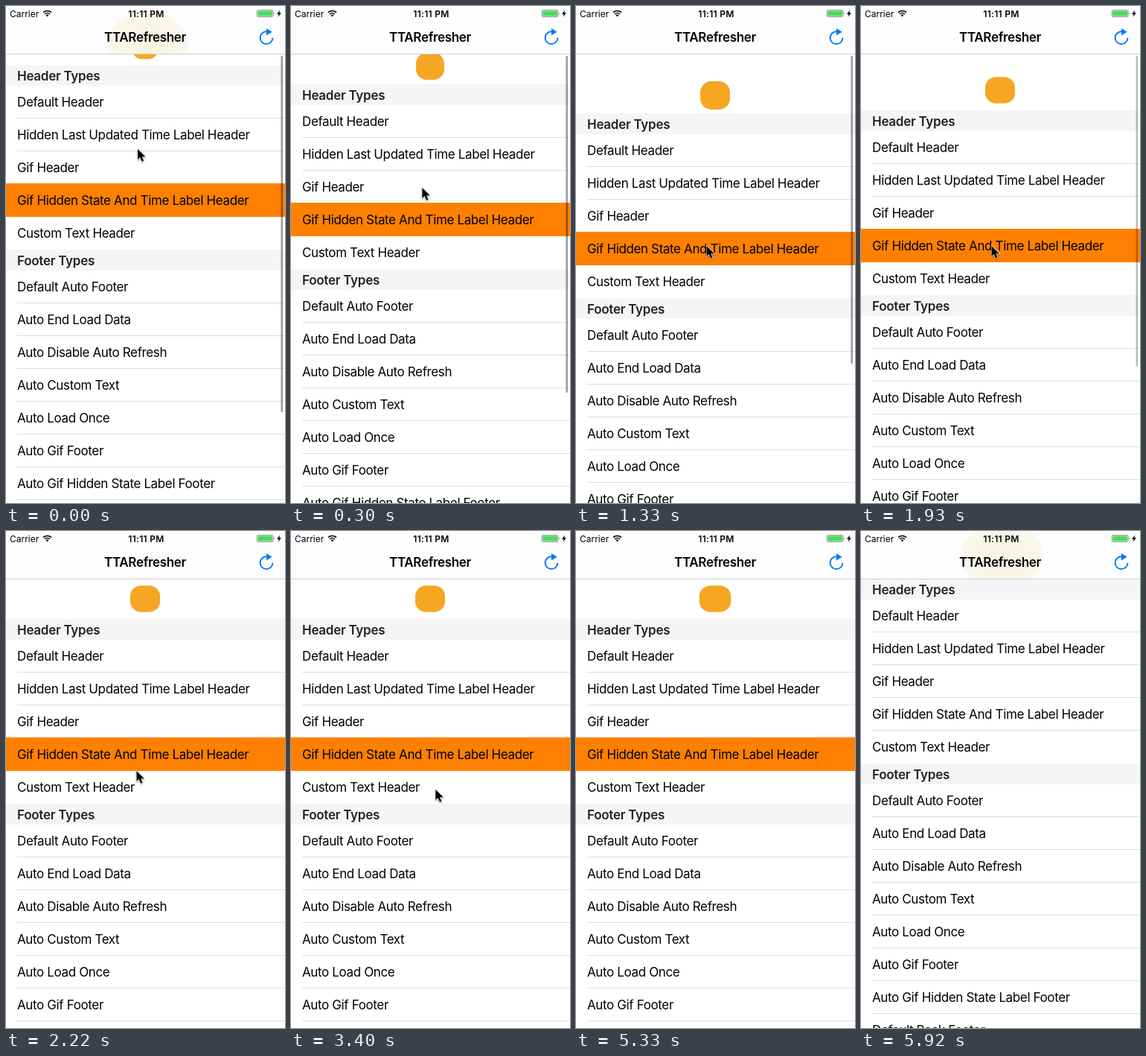
Animation, 375 px wide and 667 px high, one loop 6200 ms. Source, as an HTML page:

```html
<!DOCTYPE html>
<html lang="en">
<head>
<meta charset="utf-8">
<title>TTARefresher</title>
<style>
  html, body { margin: 0; width: 100%; height: 100%; overflow: hidden; background: #fff; }
  svg { display: block; }
  text { font: 17px Inter, Roboto, sans-serif; letter-spacing: -.37px; fill: #000; }
  .section { font-weight: 600; letter-spacing: -.27px; fill: #222; }
  .title { font-weight: 600; letter-spacing: -.32px; text-anchor: middle; }
  .status { font-size: 12px; letter-spacing: 0; }
  .clock { font-weight: 600; text-anchor: middle; letter-spacing: .3px; }
</style>
</head>
<body>
<svg width="375" height="667" viewBox="0 0 375 667">
  <defs>
    <radialGradient id="glow">
      <stop offset="0" stop-color="#f8f3df"/>
      <stop offset="1" stop-color="#faf8ee"/>
    </radialGradient>
  </defs>

  <rect id="mascot" x="-20" y="-19" width="40" height="38" rx="15" fill="#f6a623"/>
  <g id="list"></g>
  <rect id="thumb" x="369.5" y="67" width="2.5" rx="1.25" fill="#000" fill-opacity=".4"/>

  <svg width="375" height="65">
    <rect width="375" height="64" fill="#fdfdfd"/>
    <ellipse id="tint" cx="190" rx="55" ry="45" fill="url(#glow)"/>
    <rect y="64" width="375" height="1" fill="#cfcfcf"/>
  </svg>
  <text class="status" x="5" y="14.5">Carrier</text>
  <g fill="none" stroke="#000" stroke-width="1.5">
    <path d="M50 8.6a8 8 0 0 1 11 0M52 11a5 5 0 0 1 7 0"/>
    <path d="M53.6 12.2a2.8 2.8 0 0 1 3.8 0L55.5 14.4Z" fill="#000" stroke="none"/>
  </g>
  <text class="status clock" x="188.5" y="14.5">11:11 PM</text>
  <rect x="337.3" y="5.5" width="21.7" height="9" rx="1.5" fill="#fff" stroke="#555" stroke-width=".6"/>
  <rect x="338.3" y="6.5" width="19.7" height="7" rx=".5" fill="#4cd964"/>
  <path d="M359.9 8.3q1.6 1.7 0 3.4Z" fill="#555"/>
  <path d="M368.2 5.5L364 10.7H366.6L365.6 14.8L370 9.3H367.3Z"/>
  <text class="title" x="187" y="48">TTARefresher</text>
  <path d="M351 34.3H350A8.4 8.4 0 1 0 358.4 42.7" fill="none" stroke="#007aff" stroke-width="2"/>
  <path d="M350 30V39.4L357.6 34.7Z" fill="#007aff"/>

  <path id="cursor" d="M0 0V14L3.2 11.1L5.7 16.8L8.1 15.8L5.7 10.2H10.3Z"
        stroke="#fff" stroke-width="1.2" paint-order="stroke"
        style="filter: drop-shadow(0 1px 1px #0006)"/>
</svg>

<script>
const LOOP = 6200, STEP = 148.1;
const sections = [
  ['Header Types', 'Default Header', 'Hidden Last Updated Time Label Header', 'Gif Header',
    'Gif Hidden State And Time Label Header', 'Custom Text Header'],
  ['Footer Types', 'Default Auto Footer', 'Auto End Load Data', 'Auto Disable Auto Refresh',
    'Auto Custom Text', 'Auto Load Once', 'Auto Gif Footer',
    'Auto Gif Hidden State Label Footer', 'Default Back Footer']
];
const $ = id => document.getElementById(id);
const clamp = v => Math.max(0, Math.min(1, v));
const mix = (a, b, u) => a + (b - a) * u;
const smooth = u => (u = clamp(u)) * u * (3 - 2 * u);
const set = (id, attrs) => {
  for (const k in attrs) $(id).setAttribute(k, attrs[k]);
};

function buildList() {
  let y = 0, out = '';
  for (const [title, ...rows] of sections) {
    out += `<rect y="${y}" width="375" height="28" fill="#f5f5f5"/>
      <text class="section" x="15" y="${y + 20.5}">${title}</text>`;
    y += 28;
    rows.forEach((row, i) => {
      if (i < rows.length - 1)
        out += `<rect x="15" y="${y + 43}" width="360" height="1" fill="#dedde0"/>`;
      if (row.startsWith('Gif Hidden'))
        out += `<rect id="selected" y="${y - 1}" width="375" height="45" fill="#ff8000"/>`;
      out += `<text x="15" y="${y + 28}">${row}</text>`;
      y += 44;
    });
  }
  $('list').innerHTML = out;
  // keep the highlight above the separators on both of its edges
  $('list').prepend(...$('list').querySelectorAll('rect[x="15"]'));
}

// Pull down, hold, settle while loading, then slide back.
function pullAt(n) {
  if (n < 13) return mix(15, 80, 1 - (1 - clamp(n / 9)) ** 2);
  if (n < 37) return mix(80, 54, smooth((n - 12.4) / 2.6));
  return mix(54, 0, smooth((n - 36.6) / 2.8));
}

function cursorAt(n, pull) {
  if (n < 13) return [mix(177, 175.5, clamp(n / 5)), 322 + (pull - 80) * 2];
  if (n < 31) {
    const u = smooth((n - 20) / 8);
    return [mix(175.5, 235, u), mix(322, 401, u)];
  }
  const u = ((n - 30) / 6) ** 1.4;
  return [mix(235, 345, u), mix(401, 690, u)];
}

function draw(now) {
  const n = Math.floor((now % LOOP + 6) / STEP);
  const pull = Math.round(pullAt(n));
  const top = 64 + pull;
  const loading = n >= 13;
  const size = loading ? 1 : mix(.85, 1, clamp((pull - 15) / 40));
  const wide = loading && n < 37 && n % 2 === 0 ? 1.06 : 1;

  set('list', { transform: `translate(0 ${top})` });
  set('selected', { opacity: n < 37 ? 1 : 0 });
  set('mascot', {
    transform: `translate(187 ${top - (loading ? 27 : 24)}) scale(${size * wide} ${loading ? .94 : size})`
  });
  set('thumb', { height: 493 - pull, opacity: clamp((14.6 - n) / 2.4) });
  set('tint', { cy: 33 + pull * 1.3, opacity: clamp((34 - pull) / 18) });
  set('cursor', {
    transform: `translate(${cursorAt(n, pull)})`,
    opacity: n < 36 ? 1 : 0
  });
}

buildList();
const start = performance.now();
function tick(now) {
  draw(Math.max(0, now - start));
  requestAnimationFrame(tick);
}
draw(0);
requestAnimationFrame(tick);
</script>
</body>
</html>
```
